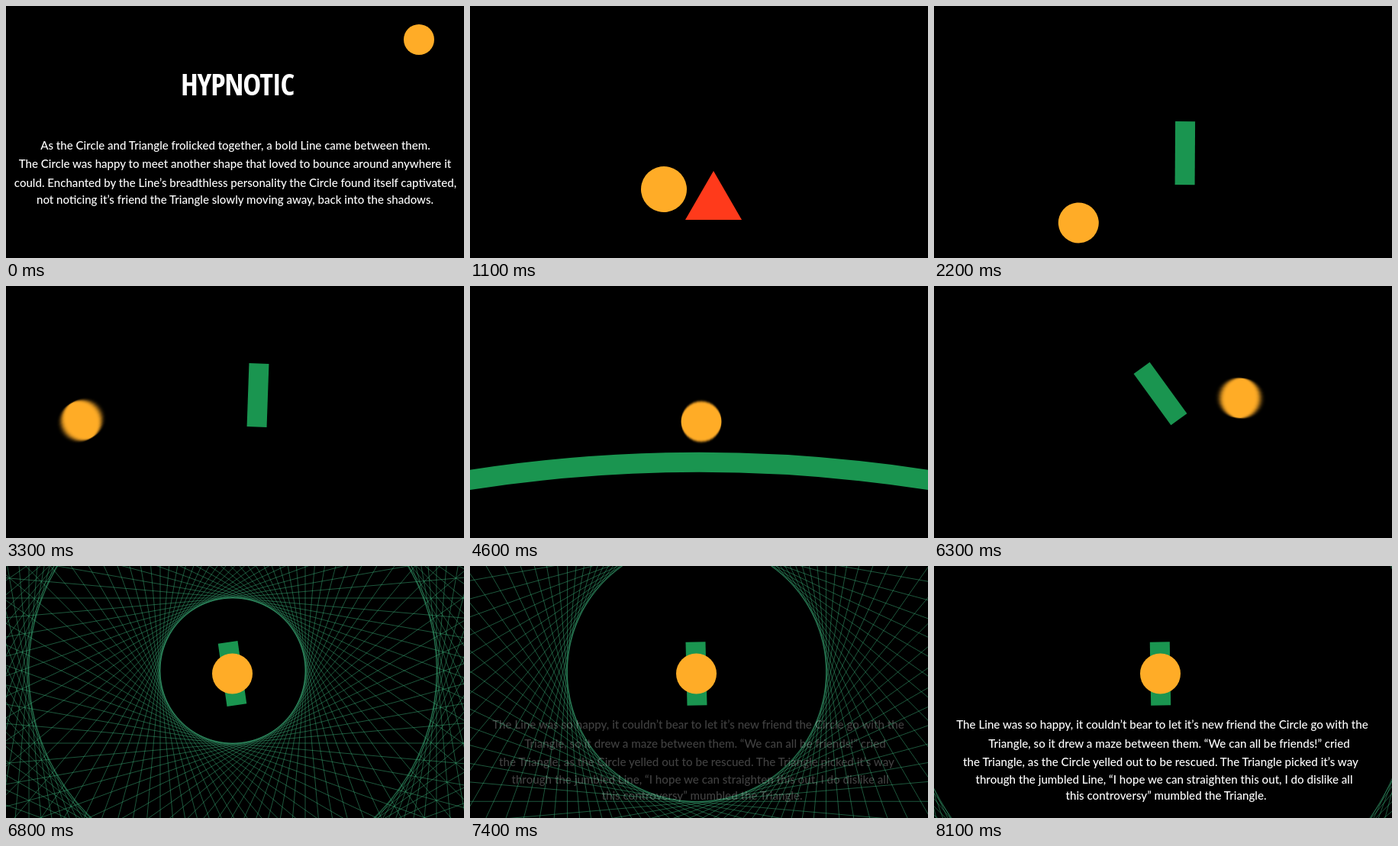
An HTML page for the animation above (8.2 s loop, 600x330 px).

```html
<!DOCTYPE html>
<html lang="en">
<head>
<meta charset="utf-8">
<title>Hypnotic</title>
<style>
  html, body { margin: 0; width: 100%; height: 100%; overflow: hidden; background: #000; }
  svg { display: block; width: 100%; height: 100%; }
  text { fill: #fff; text-anchor: middle; }
  .story { font: 500 14px Lato, "Open Sans", sans-serif; }
  .title {
    font: 600 44px "Noto Sans ExtraCondensed", "Open Sans Condensed", "Noto Sans Condensed",
      "Roboto Condensed", "Liberation Sans Narrow", "Open Sans", sans-serif;
    font-stretch: 62.5%;
    letter-spacing: -.03em;
  }
</style>
</head>
<body>
<svg viewBox="0 0 600 330" xmlns="http://www.w3.org/2000/svg">
  <defs>
    <filter id="smear" x="-50%" y="-50%" width="200%" height="200%">
      <feGaussianBlur id="smearAmount" stdDeviation="0 0"/>
    </filter>
  </defs>
  <rect width="600" height="330" fill="#000"/>
  <path id="maze" fill="none" stroke="#36a271" stroke-width=".8" opacity=".68"/>
  <path id="triangle" d="M0-32L37 32H-37Z" fill="#ff3a1b"/>
  <path id="line" fill="none" stroke="#1a9550" stroke-width="26"/>
  <g id="ball"><circle id="disc" fill="#ffac27"/></g>
  <g id="intro">
    <text class="title" x="303" y="121">HYPNOTIC</text>
    <g class="story">
      <text x="300.5" y="187.5">As the Circle and Triangle frolicked together, a bold Line came between them.</text>
      <text x="300" y="212">The Circle was happy to meet another shape that loved to bounce around anywhere it</text>
      <text x="300.5" y="236.5">could. Enchanted by the Line’s breadthless personality the Circle found itself captivated,</text>
      <text x="300" y="258.5">not noticing it’s friend the Triangle slowly moving away, back into the shadows.</text>
    </g>
  </g>
  <g id="outro" class="story">
    <text x="299" y="213">The Line was so happy, it couldn’t bear to let it’s new friend the Circle go with the</text>
    <text x="308" y="238">Triangle, so it drew a maze between them. “We can all be friends!” cried</text>
    <text x="297" y="262">the Triangle, as the Circle yelled out to be rescued. The Triangle picked it’s way</text>
    <text x="301.5" y="285">through the jumbled Line, “I hope we can straighten this out, I do dislike all</text>
    <text x="304" y="306">this controversy” mumbled the Triangle.</text>
  </g>
</svg>
<script>
const LOOP = 8200, STEP = 100;
const { PI, sin, cos, exp } = Math;
const $ = id => document.getElementById(id);
const set = (el, attrs) => { for (const k in attrs) el.setAttribute(k, attrs[k]); };
const ramp = (t, a, b) => Math.max(0, Math.min(1, (t - a) / (b - a)));
const mix = (a, b, u) => a + (b - a) * u;
const smooth = u => u * u * (3 - 2 * u);
const smoother = u => u * u * u * (10 - 15 * u + 6 * u * u);
const ease = (t, a, b) => smooth(ramp(t, a, b));
const hop = u => 4 * u * (1 - u);
const show = on => on ? "visible" : "hidden";

function ballAt(t) {
  if (t < 1100) { // drift in
    const u = ease(t, 250, 1000);
    return [mix(541, 254, u), mix(44, 240, u) + 60 * sin(PI * u)];
  }
  if (t < 1900) { // pushed left and back
    const u = ease(t, 1100, 1900);
    return [mix(254, 182, u) - 172 * sin(PI * u), 240 - 50 * sin(PI * u)];
  }
  if (t < 2800) { // dip
    const u = ramp(t, 1900, 2800);
    return [mix(182, 204, u), mix(240, 86, u) + 110 * sin(PI * u)];
  }
  if (t < 3700) { // sway
    return [160 + 85 * cos((t - 2951) * 0.0068), 176 + 95 * sin((t - 3300) * 0.0025)];
  }
  if (t < 4410) { // leap onto the line
    const u = ramp(t, 3700, 4410);
    return [mix(192, 303, u), mix(256, 242, u) - 213 * hop(u)];
  }
  if (t < 5190) return [303, 242 - 100 * hop(ramp(t, 4410, 5350))];
  // one full swing that settles in the middle
  const u = smoother(ramp(t, 5190, 6590)), swing = sin(2 * PI * u);
  return [mix(303, 296.5, u) - 268 * swing, mix(186, 141, u) - 50 * swing ** 3];
}

function drawBall(t) {
  const [x, y] = ballAt(t), [x0, y0] = ballAt(t - 5), [x1, y1] = ballAt(t + 5);
  const dx = x1 - x0, dy = y1 - y0;
  const sweep = Math.min(9, Math.hypot(dx, dy) * 2);
  const angle = Math.atan2(dy, dx) * 180 / PI;
  const r = 20 + 10 * ease(t, 300, 900) - 3.5 * ramp(t, 1100, 1700);
  set($("ball"), { transform: `translate(${x} ${y}) rotate(${angle})` });
  set($("disc"), { r, filter: sweep > 2.5 ? "url(#smear)" : "none" });
  set($("smearAmount"), { stdDeviation: `${sweep / 3} 0.01` });
}

function drawTriangle(t) {
  const size = ease(t, 500, 1000), away = ramp(t, 1200, 1800) ** 2;
  const x = 319 + 60 * (1 - size) + 360 * away;
  set($("triangle"), {
    visibility: show(t > 500 && t < 1800),
    transform: `translate(${x} ${248 - 90 * away}) rotate(${90 * away}) scale(${size})`
  });
}

function drawLine(t) {
  const fall = ease(t, 3700, 4100), rise = ease(t, 5100, 5480), flat = fall - rise;
  const bob = cos(2 * PI * (t - 3300) / 900);
  const spin = 179 * (1 - (1 - ramp(t, 5600, 8200)) ** 5.2);
  const x = 300 + 30 * (ease(t, 1450, 2300) - fall) - 3.5 * rise;
  const y = mix(203 - 60 * bob, 257, fall) - 53 * rise - 63 * ease(t, 5600, 6300);
  const half = (83 * ease(t, 1250, 1450) + 557 * flat) / 2;
  const turn = 90 - 90 * flat + 2 * bob * (1 - fall) + spin;
  const bend = 30 * cos((t - 4410) / 190 * PI) * exp((4410 - t) / 1400) * flat * ramp(t, 4300, 4410);
  set($("line"), {
    visibility: show(t > 1250),
    d: `M${-half} 0Q0 ${2 * bend} ${half} 0`,
    transform: `translate(${x} ${y}) rotate(${turn})`
  });
}

// Two rings of long tangents, both growing outward.
function drawMaze(t) {
  const total = 72, count = Math.round(total * ramp(t, 6350, 6750));
  const inner = 95 * exp((t - 6800) / 1037);
  const cy = mix(137, 141, ramp(t, 6800, 8100)), reach = 900;
  let d = "";
  for (const r of [inner, inner * 2.81]) {
    for (let i = 0; i < count; i++) {
      const a = i * 2 * PI / total, c = cos(a), s = sin(a);
      const px = 297 + r * c, py = cy + r * s;
      d += `M${px - s * reach} ${py + c * reach}L${px + s * reach} ${py - c * reach}`;
    }
  }
  set($("maze"), { d });
}

function draw(t) {
  drawMaze(t);
  drawTriangle(t);
  drawLine(t);
  drawBall(t);
  set($("intro"), { opacity: 1 - ramp(t, 200, 600) });
  set($("outro"), { opacity: ramp(t, 7300, 7700) });
}

// Picks one type size for a block from the measure of its widest line.
function sizeType(block, measure) {
  const lines = block.matches("text") ? [block] : [...block.querySelectorAll("text")];
  const widest = Math.max(...lines.map(l => l.getComputedTextLength()));
  const size = parseFloat(getComputedStyle(block).fontSize) * measure / widest;
  block.style.fontSize = size + "px";
  return size;
}
const title = document.querySelector(".title");
set(title, { y: 103 + 0.357 * sizeType(title, 148) });
sizeType(document.querySelector("#intro .story"), 580);
sizeType($("outro"), 540);

const start = performance.now();
function tick() {
  const t = (performance.now() - start) % LOOP;
  draw(Math.floor(t / STEP) * STEP);
  requestAnimationFrame(tick);
}
tick();
</script>
</body>
</html>
```
